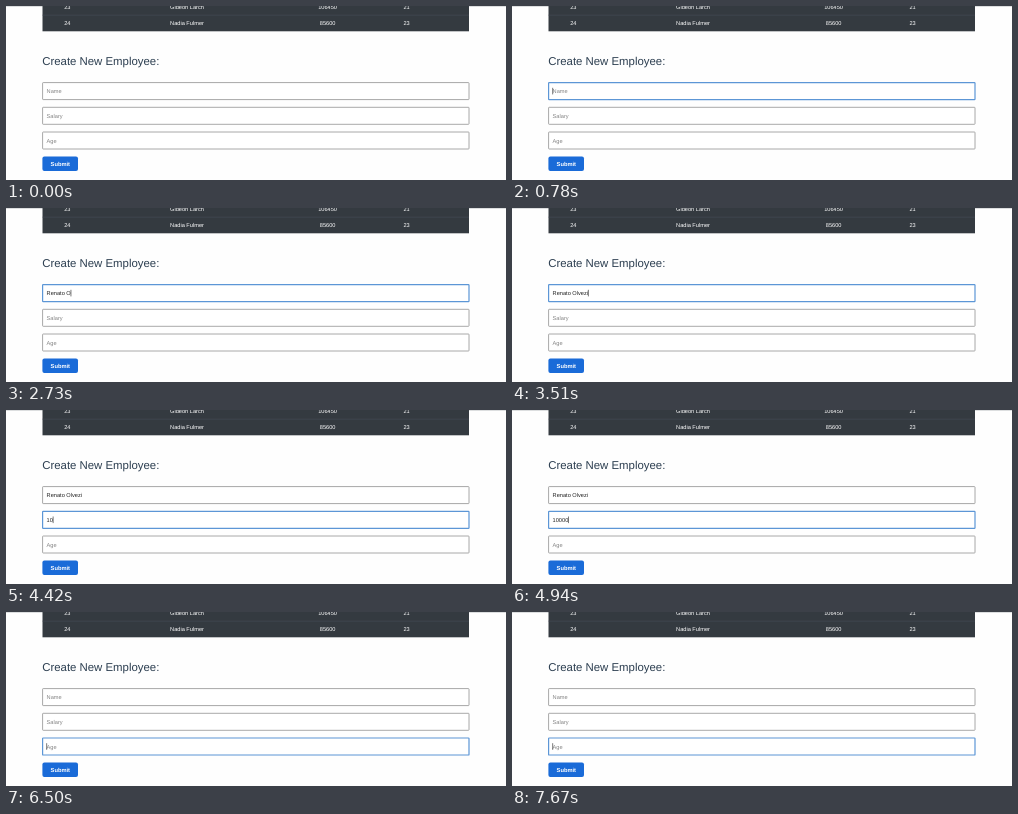
An HTML page for the animation above (8000 ms loop, 500x174 px).

```html
<!DOCTYPE html>
<html lang="en">
<head>
<meta charset="utf-8">
<style>
  html, body { margin: 0; width: 100%; height: 100%; overflow: hidden; background: #fefefe; }
  svg { display: block; width: 500px; height: 174px; }
  text { font: 5.65px "Liberation Sans", Arial, sans-serif; text-rendering: geometricPrecision; white-space: pre; }
  .cell { fill: #fff; text-anchor: middle; }
  .title { font-size: 11.4px; fill: #2c3e50; }
  .submit { font-size: 5.75px; font-weight: bold; fill: #fff; text-anchor: middle; }
</style>
</head>
<body>
<svg id="stage" viewBox="0 0 500 174">
  <rect width="500" height="0.8" fill="#d4d6d8"/>
  <rect x="36.5" width="426.5" height="25.3" fill="#343a40"/>
  <rect x="36.5" y="8.8" width="426.5" height="0.6" fill="#454d55"/>
  <text class="title" x="36.2" y="59.4">Create New Employee:</text>
  <rect x="36.4" y="150.4" width="35.6" height="14.5" rx="2" fill="#1a6bd8"/>
  <text class="submit" x="54.3" y="159.6">Submit</text>
</svg>
<script>
const LOOP = 8000, BLINK = 520;
const stage = document.getElementById('stage');

function add(tag, attrs, text = '') {
  const el = document.createElementNS('http://www.w3.org/2000/svg', tag);
  set(el, attrs);
  el.textContent = text;
  stage.append(el);
  return el;
}
function set(el, attrs) {
  for (const key in attrs) el.setAttribute(key, attrs[key]);
}

const columns = [61.3, 181, 321.6, 400.6];
const rows = [['23', 'Gideon Larch', '106450', '21'], ['24', 'Nadia Fulmer', '85600', '23']];
rows.forEach((row, r) => row.forEach((value, c) =>
  add('text', { class: 'cell', x: columns[c], y: 3 + r * 16 }, value)));

const fields = ['Name', 'Salary', 'Age'].map((hint, i) => {
  const y = 76.6 + i * 24.7;
  return {
    hint, y,
    box: add('rect', { x: 36.6, y, width: 426.4, height: 17, rx: 0.6, fill: '#fff' }),
    label: add('text', { x: 40.6, y: y + 10.6 })
  };
});
const caret = add('rect', { width: 0.6, height: 6.6, fill: '#222' });

// Each event: time, focused field, values of all fields
const events = [[0, -1, ['', '', '']]];
function at(time, field, value) {
  const values = [...events[events.length - 1][2]];
  values[field] = value;
  events.push([time, field, values]);
}
function type(field, text, times) {
  times.forEach((time, i) => at(time, field, text.slice(0, i)));
}
type(0, 'Renato Olvezi',
  [780, 1430, 1560, 1690, 1820, 1950, 2340, 2600, 2730, 2990, 3120, 3250, 3380, 3510]);
type(1, '10000', [3640, 4290, 4420, 4550, 4680, 4940]);
at(5590, 2, '');
at(5980, 2, '30');
events.push([6500, 2, ['', '', '']], [6630, 2, ['', '', '']]);

function render(time) {
  const [start, focus, values] = events.findLast(event => event[0] <= time);
  fields.forEach(({ hint, box, label }, i) => {
    const active = i === focus;
    set(box, { stroke: active ? '#5c96d6' : '#8b8b8b', 'stroke-width': active ? 1.2 : 0.75 });
    set(label, { fill: values[i] ? '#222' : '#858585' });
    label.textContent = values[i] || hint;
  });
  const visible = focus >= 0 && Math.floor((time - start) / BLINK) % 2 === 0;
  set(caret, { visibility: visible ? 'visible' : 'hidden' });
  if (visible) {
    const { label, y } = fields[focus];
    const width = values[focus] ? label.getComputedTextLength() : 0;
    set(caret, { x: 40.5 + width, y: y + 5.2 });
  }
}

function tick() {
  render(performance.now() % LOOP);
  requestAnimationFrame(tick);
}
tick();
</script>
</body>
</html>
```
